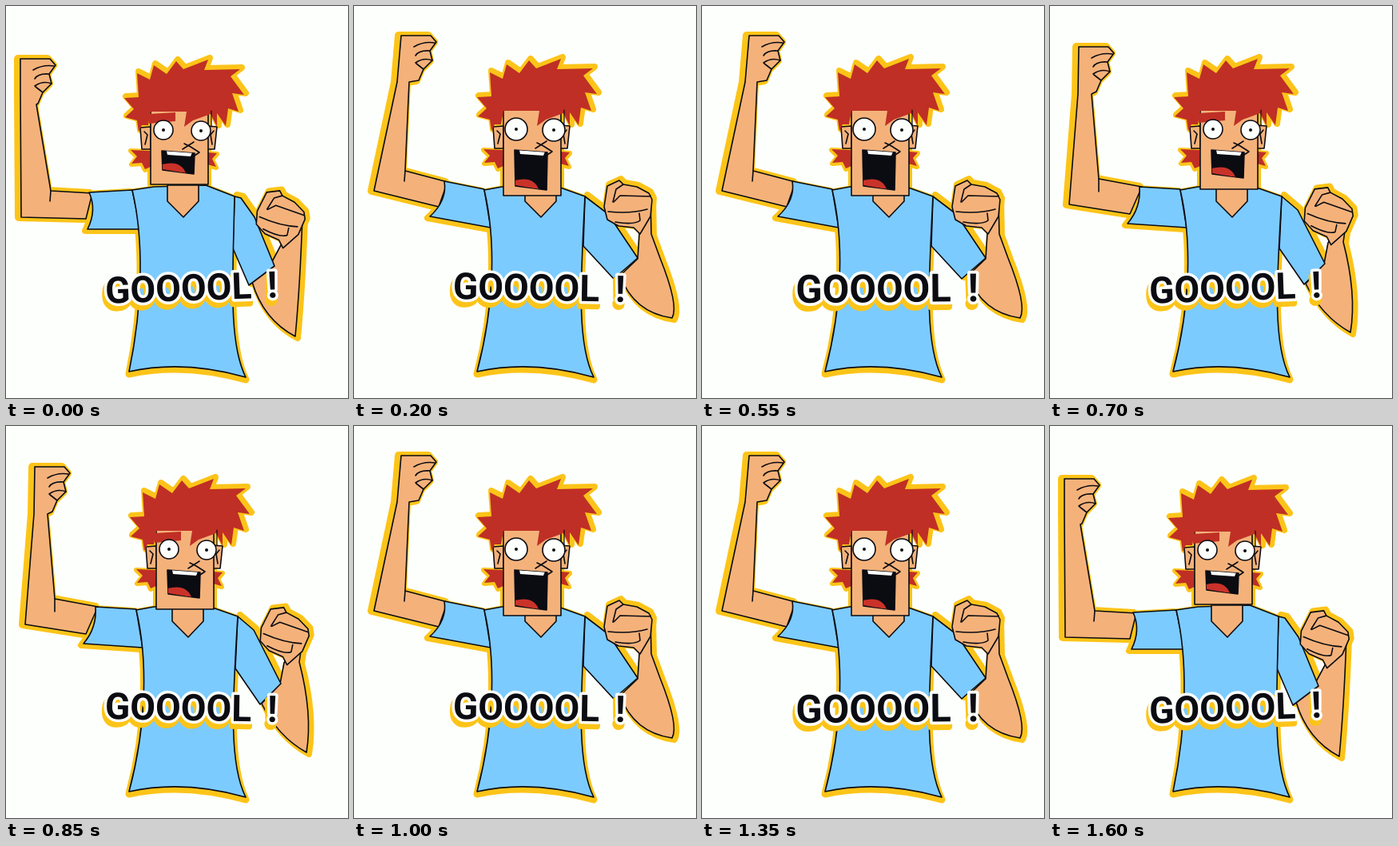
These frames come from a looping animation (428x490 px, 1650 ms). An HTML page with a canvas:

```html
<!DOCTYPE html>
<html lang="en">
<head>
<meta charset="utf-8">
<title>Goal cheer</title>
<style>
  html, body { margin: 0; width: 100%; height: 100%; overflow: hidden; background: #fdfffc; }
  canvas { display: block; }
</style>
</head>
<body>
<canvas id="stage" width="428" height="490"></canvas>
<script>
const ctx = document.getElementById('stage').getContext('2d');
const INK = '#0b0b12', SKIN = '#f4b27a', SHIRT = '#7ccbfe', HAIR = '#bf2f25', GOLD = '#fcc419', WHITE = '#fdfffc';
const STEP = 50, LOOP = 1650;

// From lowest to highest raised arm.
const poses = [
  {
    hand: [18, 66], arm: 'L38 123 56 231 108 234 100 266 19 264 18 110Z', crease: 'M56 231l-1 13',
    sleeveL: 'M158 230L104 233Q114 255 102 279L168 279Z', shoulders: [158, 286], neck: 222,
    sleeveR: 'M286 238L294 240 311 264 336 325 304 349 284 303Z',
    forearm: 'M344 299L330 325 308 345Q322 392 362 413Q368 350 371 262Z',
    fist: [341, 265, 18], head: [-6, 1], jaw: 222, mouth: 26, eye: 12, brow: true
  },
  {
    hand: [36, 51], arm: 'L52 110 61 216 115 226 100 260 24 248 35 110Z', crease: 'M61 216v16',
    sleeveL: 'M163 229L112 226Q114 252 97 272L171 277Z', shoulders: [163, 290], neck: 228,
    sleeveR: 'M290 238L310 255 344 322 318 348 287 303Z',
    forearm: 'M348 296L343 322 320 347Q340 388 376 408Q384 360 367 295L373 255Z',
    fist: [346, 261, 18], head: [1, 0], jaw: 229, mouth: 32, eye: 12, brow: true
  },
  {
    hand: [59, 37], arm: 'L69 95 64 206 117 220 106 251 25 231 54 95Z', crease: 'M64 206l-1 13',
    sleeveL: 'M163 229L113 219Q117 243 95 263L171 277Z', shoulders: [163, 289], neck: 234,
    sleeveR: 'M289 238L318 260 355 315 325 341 287 300Z',
    forearm: 'M357 285L355 316 333 337Q350 383 398 390Q407 375 383 315L372 285 371 237Z',
    fist: [341, 251, 0], head: [0, 0], jaw: 237, mouth: 47, eye: 14
  },
  {
    hand: [70, 31], arm: 'L79 90 62 199 112 213 92 248 20 219 65 88Z', crease: 'M62 199l-2 13',
    sleeveL: 'M155 231L110 214Q113 240 92 262L164 278Z', shoulders: [155, 282], neck: 218,
    sleeveR: 'M282 235L300 244 354 295 331 333 280 288Z',
    forearm: 'M345 272L352 296 338 328Q365 362 405 366L412 360Q402 315 367 270L356 222Z',
    fist: [328, 242, 0], head: [-12, 0], jaw: 239, mouth: 48, eye: 15
  }
];
const captions = [
  { turn: -2, zoom: 1, y: 351 },
  { turn: 1, zoom: 1, y: 351 },
  { turn: -.5, zoom: 1.06, y: 352 }
];
const captionCycle = [0, 1, 2, 2, 1, 1, 0, 0];

const raisedFist = 'l37 0 7 8-8 11 3 12-11 11-6 14';
const raisedFingers = 'm16 14q12-7 26-5m-24 16q4-7 18-6m-18 15q10-7 21-3m-20 4l9 7';
const lowFist = new Path2D('M-28 0L-24-26-9-33-4-28 13-25 28-17 32-9 30 12 17 34 9 26-10 24-24 16Z');
const lowFingers = new Path2D('M-17-6L-13-22-4-28M-16-6L-8-14 29-13M-23 6Q5 9 26 3M-14 19Q10 23 17 17L16 8');
const hair = new Path2D('M155 138L166 128 154 114 172 113 170 83 186 91 191 73 207 84 219 68 228 78 259 66 254 79 299 78 287 87 304 110 289 108 297 131 284 127 281 149 270 133 270 150 262 134 240 142 229 150 232 131 187 131 184 148 176 148 172 156 170 142Z');
const sideburns = new Path2D('M186 180L162 179 170 187 163 196 176 195 180 203 187 200ZM258 182L270 183 264 190 269 200 258 197Z');
const ears = new Path2D('M187 150L174 151 176 178 187 178ZM258 149L270 150 267 178 258 178Z');
const earLines = new Path2D('M179 156L183 160 180 172M266 155L262 160 264 172');
const nose = new Path2D('M227 178L241 169M229 171L237 175 248 182 242 186');

function shape(path, fill, line = 1.6) {
  ctx.fillStyle = fill;
  ctx.fill(path);
  if (line) drawLine(path, line);
}
function drawLine(path, width = 1.6, color = INK) {
  ctx.strokeStyle = color;
  ctx.lineWidth = width;
  ctx.stroke(path);
}
function halo(path, dx, dy, width = 8) {
  placed(dx, dy, 0, () => {
    shape(path, GOLD, 0);
    drawLine(path, width, GOLD);
  });
}
function placed(x, y, degrees, draw) {
  ctx.save();
  ctx.translate(x, y);
  ctx.rotate(degrees * Math.PI / 180);
  draw();
  ctx.restore();
}
function disc(x, y, r) {
  const path = new Path2D();
  path.arc(x, y, r, 0, 7);
  return path;
}

function drawHead({ jaw, mouth, eye, brow }) {
  shape(sideburns, HAIR, 0);
  shape(ears, SKIN);
  drawLine(earLines);
  shape(new Path2D(`M187 128V${jaw}H259V128Z`), SKIN);
  shape(hair, HAIR, 0);
  drawLine(new Path2D('M263 130V150'), 1.2);
  if (brow) shape(new Path2D('M185 134L218 132V143L185 146Z'), HAIR, 0);
  for (const [x, y] of [[203, 154], [250, 155]]) {
    shape(disc(x, y, eye), WHITE);
    shape(disc(x, y, 2), INK, 0);
  }
  drawLine(nose);

  const bottom = 181 + mouth;
  const open = new Path2D(`M201 180L242 183 241 ${bottom + 2} 202 ${bottom - 3}Z`);
  shape(open, INK);
  ctx.save();
  ctx.clip(open);
  shape(new Path2D('M207 180L239 182 237 187 208 185Z'), WHITE, 0);
  shape(new Path2D(`M201 ${bottom - 10}Q225 ${bottom - 16} 231 ${bottom + 1}L202 ${bottom - 4}Z`), '#c93229', 0);
  ctx.restore();
}

function drawFigure(pose) {
  const [hx, hy] = pose.hand, [left, right] = pose.shoulders;
  const raisedArm = new Path2D(`M${hx} ${hy}${raisedFist}${pose.arm}`);
  const forearm = new Path2D(pose.forearm);
  const sleeveL = new Path2D(pose.sleeveL), sleeveR = new Path2D(pose.sleeveR);
  const torso = new Path2D(`M${left} 230C${left + 14} 290 ${left + 14} 370 154 457Q222 442 300 464C278 420 284 340 ${right} 238L250 224 185 226Z`);
  const collar = new Path2D(`M${pose.neck - 20} 224V244L${pose.neck} 264 ${pose.neck + 19} 244V224Z`);

  halo(raisedArm, -3, 0, 10);
  halo(sleeveL, -3, 2);
  halo(torso, 0, 3, 9);
  halo(sleeveR, 3, -2);
  halo(forearm, 3, 2);
  placed(...pose.fist, () => halo(lowFist, 2, -2));
  placed(...pose.head, 0, () => {
    halo(hair, 2, -2);
    halo(sideburns, 0, 1, 6);
    halo(new Path2D(`M187 140V${pose.jaw}H259V140Z`), 0, 0);
  });

  shape(raisedArm, SKIN);
  drawLine(new Path2D(`M${hx} ${hy}${raisedFingers}${pose.crease}`));
  shape(forearm, SKIN);
  shape(sleeveL, SHIRT);
  shape(sleeveR, SHIRT);
  shape(torso, SHIRT);
  shape(collar, SKIN);
  placed(...pose.fist, () => {
    shape(lowFist, SKIN);
    drawLine(lowFingers);
  });
  placed(...pose.head, 0, () => drawHead(pose));
}

function drawCaption({ turn, zoom, y }) {
  placed(233, y, turn, () => {
    ctx.scale(zoom, zoom);
    ctx.font = '700 46px Roboto, sans-serif';
    const letters = (color, width, dx = 0, dy = 0) => {
      ctx.fillStyle = ctx.strokeStyle = color;
      ctx.lineWidth = width;
      for (const [word, x] of [['GOOOOL', -109], ['!', 94]]) {
        if (width) ctx.strokeText(word, x + dx, 17 + dy);
        ctx.fillText(word, x + dx, 17 + dy);
      }
    };
    letters(GOLD, 8, -2, 6);
    letters(WHITE, 7);
    letters(INK, 0);
  });
}

function render() {
  const tick = Math.floor(performance.now() % LOOP / STEP);
  const fromPeak = Math.abs(tick % 16 - 7.5);
  const level = fromPeak < 2 ? 3 : fromPeak < 5 ? 2 : fromPeak < 7 ? 1 : 0;
  ctx.fillStyle = WHITE;
  ctx.fillRect(0, 0, 428, 490);
  ctx.lineJoin = ctx.lineCap = 'round';
  drawFigure(poses[level]);
  drawCaption(captions[captionCycle[tick % 8]]);
  requestAnimationFrame(render);
}
render();
</script>
</body>
</html>
```
